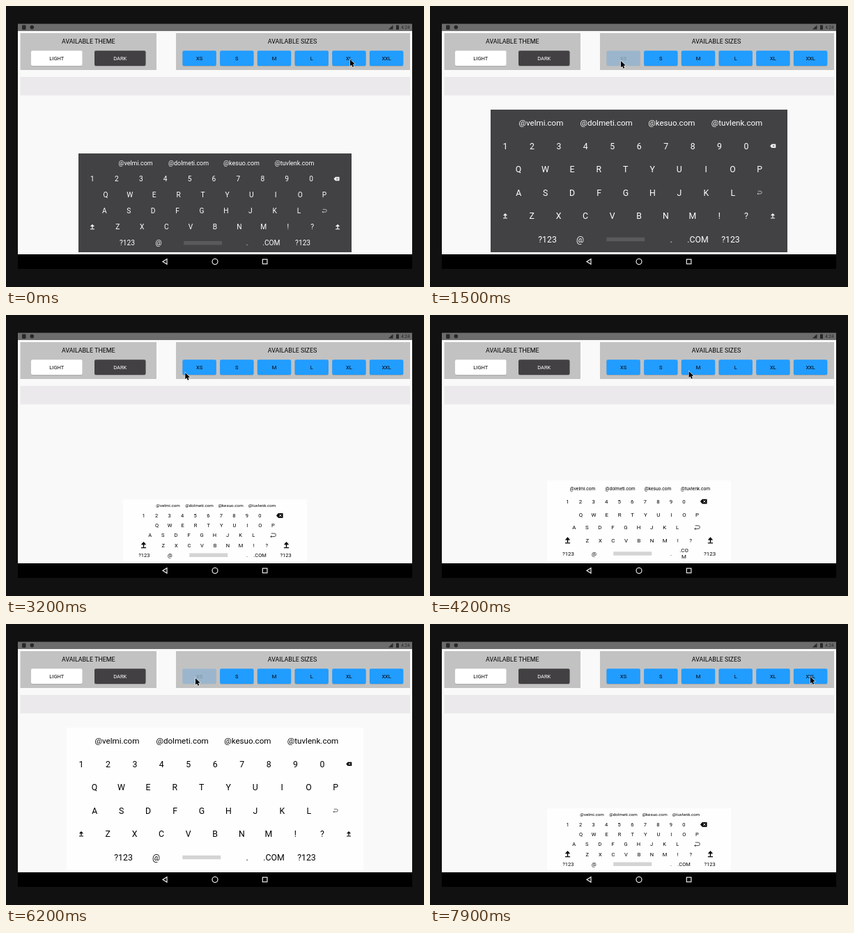
Recreate the animation shown at these times as an HTML page with a canvas. Size 600 px wide and 404 px high, loop 8 s.

```html
<!DOCTYPE html>
<html lang="en">
<head>
<meta charset="utf-8">
<title>Keyboard sizes</title>
<style>
  html, body { margin: 0; width: 100%; height: 100%; overflow: hidden; background: #111; }
  canvas { display: block; }
</style>
</head>
<body>
<canvas width="600" height="404"></canvas>
<script>
const ctx = document.querySelector('canvas').getContext('2d');
const LOOP = 8000, STEP = 100;

// left, top, key pitch, mail pitch, key font, mail font, icon scale
const XS = [168, 265, 18.55, 45, 7.5, 6.25, 1.2];
const S = [168, 238, 18.55, 54, 7.9, 6.65, 1.2];
const L = [104, 212, 34.9, 76, 10.2, 8.95, 1];
const XXL = [87, 149, 38.45, 93.7, 12.3, 11.6, 1];
const between = (a, b) => a.map((v, i) => (v + b[i]) / 2);
const sizes = { XS, S, M: between(S, L), L, XL: between(L, XXL), XXL };

const themes = {
  dark: { back: '#424143', ink: '#fff', bar: '#5a595b' },
  light: { back: '#fefefe', ink: '#000', bar: '#d4d4d4' }
};
const mails = ['@velmi.com', '@dolmeti.com', '@kesuo.com', '@tuvlenk.com'];

// button, press time, release time
const presses = [
  ['XL', 60, 220], ['XXL', 600, 720], ['XS', 1380, 1620], ['LIGHT', 2250, 2560],
  ['S', 3540, 3820], ['M', 4340, 4440], ['L', 4720, 4880],
  ['XL', 5080, 5220], ['XXL', 5400, 5520], ['XS', 6080, 6320]
];

// pointer moves: start, end, target x, target y
const startPoint = [494, 77];
const moves = [
  [250, 550, 547, 78], [900, 1350, 274, 79], [1800, 2250, 80, 77],
  [2700, 3350, 285, 79], [3350, 3550, 331, 79], [3950, 4320, 385, 79],
  [4480, 4680, 438, 78], [4860, 5000, 490, 75], [5230, 5380, 546, 78],
  [5600, 6050, 272, 78], [7420, 7900, 546, 76]
];

const clamp = v => Math.max(0, Math.min(1, v));
const ease = v => v * v * (3 - 2 * v);

function rect(x, y, w, h, color, radius = 0) {
  ctx.fillStyle = color;
  ctx.beginPath();
  ctx.roundRect(x, y, w, h, radius);
  ctx.fill();
}

function text(str, x, y, size, color, align = 'center') {
  ctx.font = `${size}px Roboto, sans-serif`;
  ctx.textAlign = align;
  ctx.fillStyle = color;
  ctx.fillText(str, x, y + size * 0.355);
}

function shape(points, close = true) {
  ctx.beginPath();
  points.forEach(([x, y]) => ctx.lineTo(x, y));
  if (close) ctx.closePath();
}

function opacity(name, t) {
  let value = 1;
  for (const [button, down, up] of presses) {
    if (button !== name || t < down) continue;
    value = t < up ? 1 - 0.78 * ease(clamp((t - down) / 120))
                   : 0.22 + 0.78 * ease(clamp((t - up) / 250));
  }
  return value;
}

function button(name, x, width, color, ink, t) {
  ctx.save();
  ctx.globalAlpha = opacity(name, t);
  rect(x, 65, width, 22, 'rgba(0,0,0,.13)', 2);
  rect(x, 64.3, width, 21.7, color, 2);
  text(name, x + width / 2, 75.3, 7.5, ink);
  ctx.restore();
}

const icons = {
  erase({ ink, back }) {
    ctx.fillStyle = ink;
    shape([[-4, 0], [-1.6, -2.8], [4, -2.8], [4, 2.8], [-1.6, 2.8]]);
    ctx.fill();
    ctx.strokeStyle = back;
    ctx.lineWidth = 0.8;
    ctx.beginPath();
    ctx.moveTo(-0.5, -1.4); ctx.lineTo(2.3, 1.4);
    ctx.moveTo(2.3, -1.4); ctx.lineTo(-0.5, 1.4);
    ctx.stroke();
  },
  enter({ ink }) {
    ctx.strokeStyle = ink;
    ctx.lineWidth = 0.6;
    ctx.beginPath();
    ctx.moveTo(-2.3, -2.2); ctx.lineTo(1.3, -2.2);
    ctx.arc(1.3, -0.3, 1.9, -Math.PI / 2, Math.PI / 2);
    ctx.lineTo(-3, 1.6);
    ctx.moveTo(-1.7, 0.3); ctx.lineTo(-3, 1.6); ctx.lineTo(-1.7, 2.9);
    ctx.stroke();
  },
  shift({ ink }) {
    ctx.fillStyle = ink;
    shape([[0, -4], [3.1, -0.6], [-3.1, -0.6]]);
    ctx.fill();
    ctx.fillRect(-0.6, -1.5, 1.2, 4);
    ctx.fillRect(-3, 2.6, 6, 1);
  }
};

const WIDE = 38, SIDE = 55.5, SPACE = 92;
const rows = [
  [...'1234567890', 'erase'],
  [...'QWERTYUIOP'],
  [...'ASDFGHJKL', 'enter'],
  ['shift', ...'ZXCVBNM!?', 'shift'],
  ['?123', '@', 'space', '.', '.COM', '?123']
];

function keyboard([left, top, pitch, mailPitch, font, mailFont, scale], theme) {
  const { back, ink, bar } = theme;
  const rowHeight = (350.2 - top) / 6;
  const rowY = i => top + 2 + rowHeight * (i + 0.5);
  const keyWidth = key => icons[key] ? WIDE : key === 'space' ? SPACE : key === '?123' ? SIDE : pitch;
  rect(left, top, 600 - 2 * left, 354 - top, back);
  mails.forEach((mail, i) => text(mail, 300 + (i - 1.5) * mailPitch, rowY(0), mailFont, ink));
  rows.forEach((row, r) => {
    const y = rowY(r + 1);
    let x = 300 - row.reduce((sum, key) => sum + keyWidth(key), 0) / 2;
    for (const key of row) {
      const width = keyWidth(key), center = x + width / 2;
      x += width;
      if (icons[key]) {
        ctx.save();
        ctx.translate(center, y);
        ctx.scale(scale, scale);
        icons[key](theme);
        ctx.restore();
      } else if (key === 'space') {
        rect(center - 27.5, y - 2.6, 55, 5.4, bar);
      } else if (key === '.COM' && font > 7.6 && pitch < 20) {
        text('.CO', center, y - 4.5, font, ink);
        text('M', center, y + 4.8, font, ink);
      } else {
        text(key, center, y, font, ink);
      }
    }
  });
}

function device() {
  rect(0, 0, 600, 404, '#111');
  rect(17, 25, 566, 353, '#000');
  rect(17, 25.5, 566, 10.5, '#6c6c6c');
  rect(17, 36, 566, 321, '#f9f9f9');

  const dark = '#282828';
  rect(23, 27.5, 5.5, 6.5, dark, 1);
  rect(34.5, 27.8, 5.6, 5.6, dark, 2.8);
  ctx.fillStyle = dark;
  shape([[549, 33.5], [555.5, 33.5], [555.5, 27.5]]);
  ctx.fill();
  rect(560, 27.5, 4, 6.5, dark, 0.5);
  text('4:24', 579.5, 30.8, 6.3, dark, 'right');

  ctx.strokeStyle = '#fff';
  ctx.lineWidth = 1.1;
  shape([[225, 367.5], [231, 363.7], [231, 371.3]]);
  ctx.stroke();
  ctx.beginPath();
  ctx.arc(300, 367.5, 4, 0, 2 * Math.PI);
  ctx.stroke();
  ctx.strokeRect(368.3, 364.2, 6.6, 6.6);

  rect(20.5, 39, 195.5, 53, '#c2c2c2');
  rect(244, 39, 336, 53, '#c2c2c2');
  rect(20.5, 102, 559.5, 26.5, '#ebe9eb');
  text('AVAILABLE THEME', 118.3, 51, 8.9, '#000');
  text('AVAILABLE SIZES', 411, 51, 8.9, '#000');
}

function pointer(t) {
  let [x, y] = startPoint;
  for (const [from, to, targetX, targetY] of moves) {
    if (t < from) break;
    const k = ease(clamp((t - from) / (to - from)));
    const dip = Math.min(11, Math.abs(targetX - x) * 0.05) * Math.sin(Math.PI * k);
    x += (targetX - x) * k;
    y += (targetY - y) * k + dip;
  }
  ctx.save();
  ctx.translate(x, y);
  shape([[0, 0], [0, 9.3], [2.1, 7.4], [3.6, 10.8], [5.2, 10.1], [3.8, 6.8], [6.7, 6.6]]);
  ctx.strokeStyle = 'rgba(255,255,255,.75)';
  ctx.lineWidth = 1.2;
  ctx.stroke();
  ctx.fillStyle = '#000';
  ctx.fill();
  ctx.restore();
}

function draw(now) {
  const t = Math.floor(now % LOOP / STEP) * STEP;
  let size = 'L', theme = 'dark';
  for (const [name, , up] of presses) {
    if (t < up) break;
    if (sizes[name]) size = name;
    else theme = 'light';
  }
  device();
  button('LIGHT', 36, 73.5, '#fff', '#000', t);
  button('DARK', 127, 73.5, '#424043', '#fff', t);
  Object.keys(sizes).forEach((name, i) => button(name, 253.4 + i * 53.7, 48.4, '#219cff', '#000', t));
  keyboard(sizes[size], themes[theme]);
  pointer(t);
}

const began = performance.now();
function tick() {
  draw(performance.now() - began);
  requestAnimationFrame(tick);
}
tick();
</script>
</body>
</html>
```
